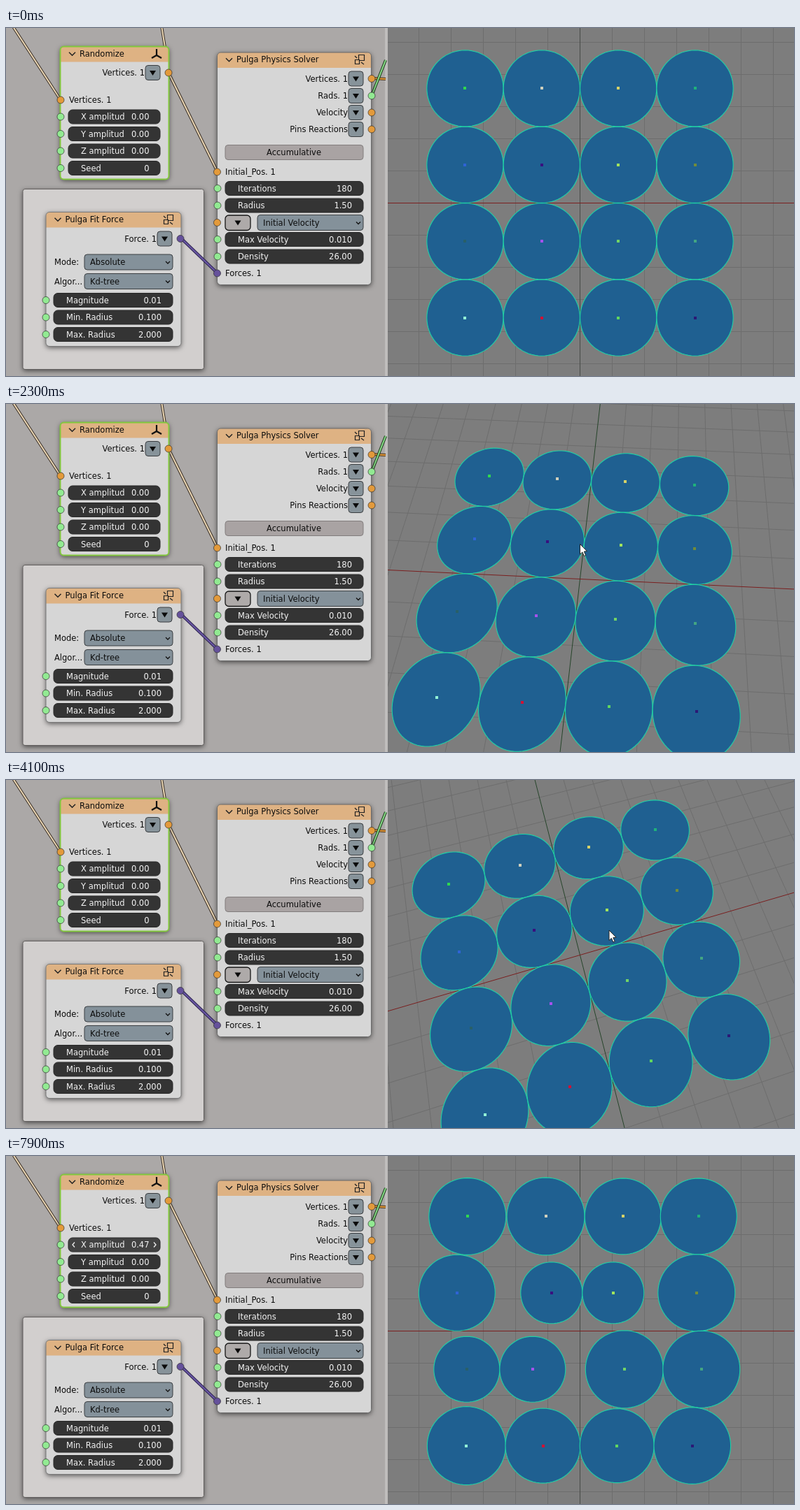
These frames come from a looping animation (1125x498 px, 8 s). An HTML page with a canvas:

```html
<!DOCTYPE html>
<html lang="en">
<head>
<meta charset="utf-8">
<title>Physics solver nodes</title>
<style>
html, body { margin: 0; width: 100%; height: 100%; overflow: hidden; background: #7d7d7d; }
canvas { display: block; width: 100vw; height: 100vh; }
</style>
</head>
<body>
<canvas id="stage" width="1125" height="498"></canvas>
<script>
const ctx = document.getElementById('stage').getContext('2d');
const LOOP = 8000, STEP = 100;
const ORANGE = '#e39a3b', GREEN = '#92ea92', PURPLE = '#65519b';

// ---- timing ---------------------------------------------------------------
// Keys are [time, ...values], interpolated linearly.
const viewKeys = [[1700, 0, 0], [1900, -4.5, 0], [2700, -1.1, 43.5], [3400, 24.1, 44.3], [4100, 16.8, 17.1]];
const amountKeys = [[6300, 0], [7200, 0.19], [7900, 0.47]];
const cursorKeys = [[300, 1099, 57], [800, 823, 252], [1700, 823, 252], [1900, 813, 251], [2700, 826, 150],
  [3400, 880, 159], [4100, 861, 215], [4300, 861, 215], [4600, 857, 213], [4700, 857, 213], [5600, 125, 140]];

function track(keys, t) {
  if (t <= keys[0][0]) return keys[0].slice(1);
  for (let i = 1; i < keys.length; i++) {
    const a = keys[i - 1], b = keys[i];
    if (t <= b[0]) {
      const k = (t - a[0]) / (b[0] - a[0]);
      return a.slice(1).map((v, j) => v + (b[j + 1] - v) * k);
    }
  }
  return keys[keys.length - 1].slice(1);
}

// ---- drawing helpers ------------------------------------------------------
function path(points, stroke, width = 1, fill, close) {
  ctx.beginPath();
  points.forEach(([x, y]) => ctx.lineTo(x, y));
  if (close) ctx.closePath();
  if (fill) { ctx.fillStyle = fill; ctx.fill(); }
  if (stroke) { ctx.strokeStyle = stroke; ctx.lineWidth = width; ctx.stroke(); }
}

function box(x, y, w, h, r, fill, stroke, width = 1) {
  ctx.beginPath();
  ctx.roundRect(x, y, w, h, r);
  if (fill) { ctx.fillStyle = fill; ctx.fill(); }
  if (stroke) { ctx.strokeStyle = stroke; ctx.lineWidth = width; ctx.stroke(); }
}

function text(str, x, cy, align = 'left', color = '#0c0c0c') {
  ctx.textAlign = align;
  ctx.fillStyle = color;
  ctx.fillText(str, x, Math.round(cy + 4));
}

function withShadow(draw) {
  ctx.save();
  ctx.shadowColor = 'rgba(0,0,0,.6)';
  ctx.shadowBlur = 7;
  ctx.shadowOffsetY = 2;
  draw();
  ctx.restore();
}

const triangle = (x, y) => path([[x - 4.5, y - 3], [x + 4.5, y - 3], [x, y + 4]], null, 0, '#0a0a0a', true);
const chevron = (x, y, s, color, w = 1.5) => path([[x - s, y - s / 2], [x, y + s / 2], [x + s, y - s / 2]], color, w);

function link(points, outer, inner, width = 4) {
  path(points, outer, width);
  path(points, inner, width * 0.5);
}

function socket(x, y, color) {
  ctx.beginPath();
  ctx.arc(x, y, 5, 0, 7);
  ctx.fillStyle = color;
  ctx.fill();
  ctx.strokeStyle = 'rgba(40,40,40,.65)';
  ctx.lineWidth = 1;
  ctx.stroke();
}

function node(x, y, w, h, title, border, width) {
  withShadow(() => box(x, y, w, h, 5, '#d6d6d6'));
  box(x, y, w, 22, [5, 5, 0, 0], '#deb283');
  box(x, y, w, h, 5, null, border, width);
  chevron(x + 17, y + 10.5, 4.5, '#222');
  text(title, x + 27.5, y + 10);
}

function output(label, x, y, color) {
  text(label, x - 34, y, 'right');
  box(x - 33, y - 10.5, 21, 21, 4, '#87939a', '#3a3d40');
  triangle(x - 22.5, y);
  socket(x, y, color);
}

function field(x, y, w, label, value, inset, hover) {
  box(x, y - 10, w, 20, 6, hover ? '#424242' : '#343434', '#282828');
  text(label, x + 18, y, 'left', '#f4f4f4');
  text(value, x + w - inset, y, 'right', '#f4f4f4');
  socket(x - 11, y, GREEN);
  if (!hover) return;
  path([[x + 9, y - 3.5], [x + 6, y], [x + 9, y + 3.5]], '#eee', 1.3);
  path([[x + w - 9, y - 3.5], [x + w - 6, y], [x + w - 9, y + 3.5]], '#eee', 1.3);
}

function dropdown(x, y, w, label) {
  box(x, y - 11, w, 22, 4, '#84919a', '#3b3f42');
  text(label, x + 8, y);
  chevron(x + w - 7, y + 0.5, 3, '#111', 1.3);
}

function windowsIcon(x, y) {
  box(x - 1.5, y - 6.5, 8, 8, 0, null, '#222', 1.2);
  box(x - 6.5, y + 0.5, 6, 6, 0, '#deb283', '#222', 1.2);
  path([[x - 7, y - 5], [x - 4, y - 2]], '#222', 1.2);
  path([[x + 2, y + 4], [x + 6, y + 7]], '#222', 1.2);
}

// ---- node editor ----------------------------------------------------------
function drawNodes(amount, hover) {
  ctx.fillStyle = '#aba8a7';
  ctx.fillRect(0, 0, 545, 498);
  ctx.fillStyle = '#bfbdbc';
  ctx.fillRect(541, 0, 4, 498);

  withShadow(() => box(24, 230.5, 258.5, 258, 3, '#d2cfce'));
  box(24, 230.5, 258.5, 258, 3, null, '#625f5e');

  const wire = ['#3b3027', '#ead6b4'];
  link([[10, -2], [78, 103]], ...wire);
  link([[222, -3], [229, 40]], ...wire);
  link([[232, 64], [302, 206]], ...wire);
  link([[522, 72], [542, 73]], '#4a3013', ORANGE);
  link([[522, 97], [542, 46]], '#20401f', '#8ade8a');

  node(77.5, 26.5, 155, 190, 'Randomize', '#83c83e', 2);
  for (const [x, y] of [[215, 30], [208, 43], [222, 43]]) path([[215, 39], [x, y]], '#111', 2.2);
  output('Vertices. 1', 232, 64, ORANGE);
  text('Vertices. 1', 90, 103);
  socket(78, 103, ORANGE);
  field(89, 127, 131, 'X amplitud', amount.toFixed(2), 15.5, hover);
  field(89, 151.5, 131, 'Y amplitud', '0.00', 15.5);
  field(89, 176, 131, 'Z amplitud', '0.00', 15.5);
  field(89, 200.5, 131, 'Seed', '0', 15.5);

  node(301.5, 35, 220, 332.5, 'Pulga Physics Solver', '#6a6a6a', 1);
  windowsIcon(505, 45);
  output('Vertices. 1', 522, 72.5, ORANGE);
  output('Rads. 1', 522, 97, GREEN);
  output('Velocity', 522, 121, ORANGE);
  output('Pins Reactions', 522, 145, ORANGE);
  box(313, 167.5, 197, 21, 4, '#a9a3a3', '#817c7c');
  text('Accumulative', 411, 178, 'center');
  text('Initial_Pos. 1', 313, 206);
  socket(301.5, 206, ORANGE);
  field(313, 229.5, 197, 'Iterations', '180', 16);
  field(313, 254, 197, 'Radius', '1.50', 16);
  box(313, 268, 36, 21.5, 5, '#aeaaa9', '#161616', 1.3);
  triangle(331, 278.5);
  socket(301.5, 278.5, ORANGE);
  dropdown(359, 278.5, 151, 'Initial Velocity');
  field(313, 302.5, 197, 'Max Velocity', '0.010', 16);
  field(313, 327, 197, 'Density', '26.00', 16);
  text('Forces. 1', 313, 351);

  node(57, 263.5, 193, 192, 'Pulga Fit Force', '#7a7a7a', 1);
  windowsIcon(232, 274);
  link([[250, 301], [302, 351]], '#2f2752', '#6a56a5', 4.4);
  output('Force. 1', 249, 301.5, PURPLE);
  socket(301.5, 351, PURPLE);
  text('Mode:', 69, 335);
  dropdown(112, 335, 126, 'Absolute');
  text('Algor...', 69, 362.5);
  dropdown(112, 362.5, 126, 'Kd-tree');
  field(68, 389.5, 170, 'Magnitude', '0.01', 16);
  field(68, 414, 170, 'Min. Radius', '0.100', 16);
  field(68, 438.5, 170, 'Max. Radius', '2.000', 16);
}

// ---- 3D view --------------------------------------------------------------
const CENTER = [819.5, 250.5], DISTANCE = 509, UNIT = 46, SPACING = 109.4;
const AXIS_RIGHT = 85, AXIS_UP = 48; // optical axis, relative to the world centre
const FULL = 0.47;
// Shift and radius of each disc at full random amount, row by row.
const shifts = [3.4, 5.8, 6.6, 5.2, -11.6, 14, -7.4, 2.2, 2.4, -13, 8.6, 9.2, 1.9, 1.7, -2, -3.8];
const radii = [55, 55.5, 54.5, 54.5, 54.5, 44, 44, 55, 47, 47, 55.5, 55, 56, 53.5, 53, 54.8];
const dots = ['#2fd84f', '#cfd0bd', '#d6d268', '#1fb27b', '#2f64d6', '#38107f', '#a2e45c', '#718c3a',
  '#285f68', '#a552ee', '#72d466', '#43a583', '#92f5d6', '#d31034', '#5fd65f', '#2b1976'];

function camera(yawDeg, tiltDeg) {
  const yaw = yawDeg * Math.PI / 180, tilt = tiltDeg * Math.PI / 180;
  const cy = Math.cos(yaw), sy = Math.sin(yaw), ct = Math.cos(tilt), st = Math.sin(tilt);
  const depth = (x, y) => 1 + (x * sy + y * cy) * st / DISTANCE;
  const project = (x, y) => {
    const v = x * sy + y * cy, w = depth(x, y);
    return [
      CENTER[0] + (x * cy - y * sy + AXIS_RIGHT * (w - 1)) / w,
      CENTER[1] - (v * ct + AXIS_UP * (w - 1)) / w,
    ];
  };
  return { depth, project };
}

function worldLine(cam, a, b, color) {
  const near = 0.12, wa = cam.depth(...a), wb = cam.depth(...b);
  if (wa < near && wb < near) return;
  const k = (near - wa) / (wb - wa), cut = [a[0] + (b[0] - a[0]) * k, a[1] + (b[1] - a[1]) * k];
  path([cam.project(...(wa < near ? cut : a)), cam.project(...(wb < near ? cut : b))], color);
}

function drawView(t, amount) {
  const perspective = t >= 1500 && t < 4200;
  const cam = camera(...(perspective ? track(viewKeys, t) : [0, 0]));
  ctx.save();
  ctx.beginPath();
  ctx.rect(545, 0, 580, 498);
  ctx.clip();
  ctx.fillStyle = '#7d7d7d';
  ctx.fillRect(545, 0, 580, 498);

  const far = UNIT * 40;
  for (let i = -40; i <= 40; i++) {
    if (!i) continue;
    worldLine(cam, [i * UNIT, -far], [i * UNIT, far], '#6d6d6d');
    worldLine(cam, [-far, i * UNIT], [far, i * UNIT], '#6d6d6d');
  }
  worldLine(cam, [0, -far], [0, far], perspective ? '#27452b' : '#474b47');
  worldLine(cam, [-far, 0], [far, 0], '#7a1f1f');

  const mix = amount / FULL;
  dots.forEach((color, i) => {
    const x = (i % 4 - 1.5) * SPACING + shifts[i] * mix;
    const y = (1.5 - Math.floor(i / 4)) * SPACING;
    const r = 54.6 + (radii[i] - 54.6) * mix;
    const rim = Array.from({ length: 72 }, (_, j) => {
      const a = j * Math.PI / 36;
      return cam.project(x + r * Math.cos(a), y + r * Math.sin(a));
    });
    path(rim, '#1fd0a6', 1.1, '#1f6091', true);
    const [px, py] = cam.project(x, y);
    ctx.fillStyle = color;
    ctx.fillRect(Math.round(px - 2), Math.round(py - 2), 4, 4);
  });
  ctx.restore();
}

// ---- pointer --------------------------------------------------------------
function drawPointer(t) {
  if (t < 300 || t >= 6200) return;
  if (t < 5700) {
    const [x, y] = track(cursorKeys, t);
    const arrow = [[0, 0], [0, 14.5], [3.4, 11.4], [5.8, 17], [8.2, 16], [5.8, 10.6], [10, 10.2]];
    path(arrow.map(([dx, dy]) => [x + dx, y + dy]), '#222', 1, '#fff', true);
    return;
  }
  const x = 119.5, y = 126;
  const arms = [
    [[x - 7, y], [x + 8, y]],
    [[x - 4, y - 3], [x - 7, y], [x - 4, y + 3]],
    [[x + 5, y - 3], [x + 8, y], [x + 5, y + 3]],
  ];
  arms.forEach(arm => path(arm, '#8d96a8', 2));
  arms.forEach(arm => path(arm, '#10131c', 1.2));
}

const start = performance.now();
let shown = -1;
function frame() {
  const t = Math.floor((performance.now() - start) % LOOP / STEP) * STEP;
  if (t !== shown) {
    shown = t;
    const [amount] = track(amountKeys, t);
    ctx.font = '11.5px "DejaVu Sans", sans-serif';
    drawNodes(amount, t >= 5700);
    drawView(t, amount);
    drawPointer(t);
  }
  requestAnimationFrame(frame);
}
frame();
</script>
</body>
</html>
```
